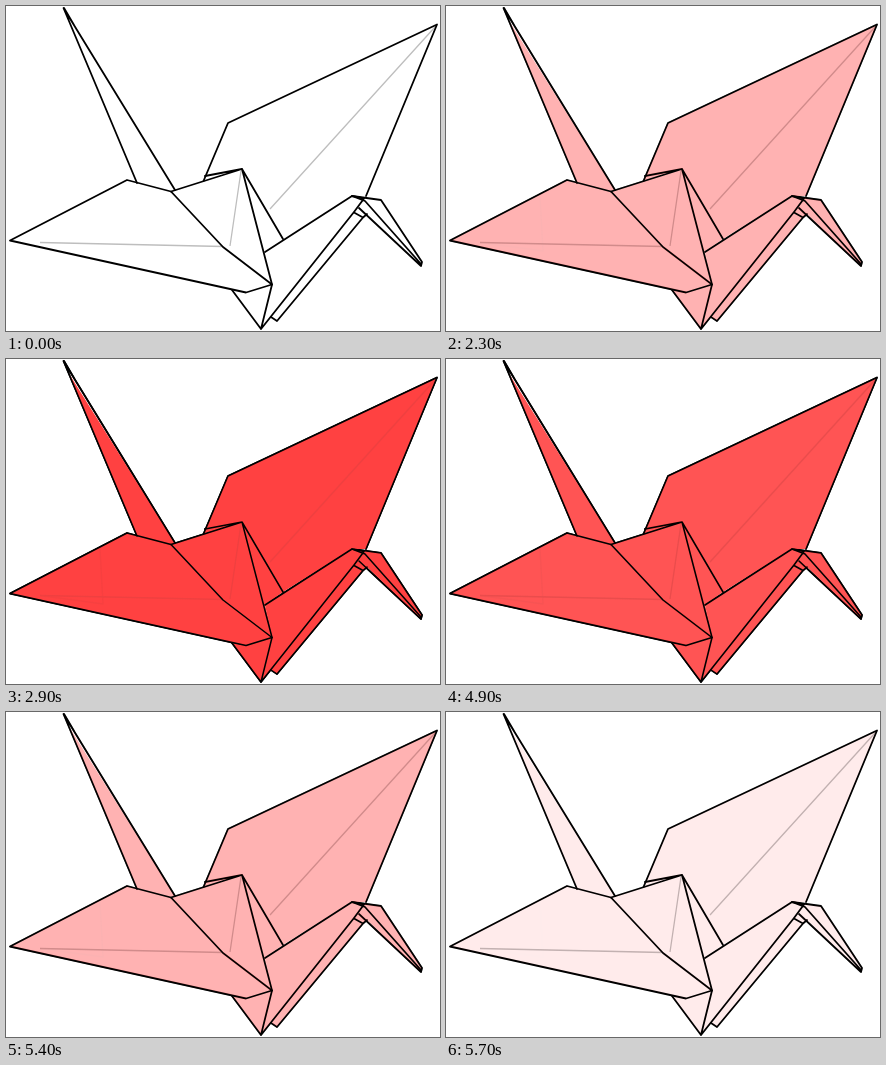
An HTML page that plays this animation: 434 px wide and 325 px high, repeating every 5.8 s.

```html
<!DOCTYPE html>
<html lang="en">
<head>
<meta charset="utf-8">
<title>Origami crane</title>
<style>
html, body { margin: 0; width: 100%; height: 100%; overflow: hidden; background: #fff; }
svg { display: block; width: 434px; height: 325px; }
.ink { fill: none; stroke: #000; stroke-linejoin: round; stroke-linecap: round; }
.crease { fill: none; stroke: #bebebe; stroke-width: 1.3; }
.paper { fill: #ff4141; }
.tint { opacity: 0; animation: tint 5800ms linear infinite; }
.tint .crease { stroke: #ef4040; }
/* Ten hard 100 ms steps up, then nine down before the loop returns to white. */
@keyframes tint {
  0% { opacity: 0; animation-timing-function: step-end; }
  34.48% { opacity: 0; animation-timing-function: steps(10, start); }
  51.72% { opacity: 1; }
  84.48% { opacity: 1; animation-timing-function: steps(9, start); }
  100% { opacity: .1; }
}
</style>
</head>
<body>
<svg viewBox="0 0 434 325">
  <defs>
    <g id="folds">
      <path d="M131 177 57.500 2 169 184M58 2 68 19"/>
      <path d="M165 185.500 121 174 4 234.500 240 286.500 266 278.500 217 241Z"/>
      <path d="M165 185.500 236 163 266 278.500M236 163 277 233M199 170 236 163"/>
      <path d="M197.500 175 222 117 431 18.500 360 190"/>
      <path d="M226 284 255 323 266 278.500M259 246 346 190 358 192.500 348 206 255 323"/>
      <path d="M265 311 271 315 357 211.500 348 206.500M357 211.500 361 208"/>
      <path d="M346 190 375 194 416 256 415 260 353 202M346 190 359 195 415 258"/>
    </g>
    <g id="creases">
      <path d="M34 236.500 217 240.500M235 165 224 240M429 21 264 203"/>
    </g>
  </defs>
  <use href="#creases" class="crease"/>
  <use href="#folds" class="ink" stroke-width="1.8"/>
  <g class="tint">
    <g class="paper">
      <path d="M62 13 131 177 165 185.500 169 184Z"/>
      <path d="M4 234.500 121 174 165 185.500 236 163 277 233 259 246 266 278.500 240 286.500Z"/>
      <path d="M197.500 175 222 117 431 18.500 360 190 346 190 277 233 236 163Z"/>
      <path d="M226 284 240 286.500 266 278.500 259 246 346 190 375 194 416 256 415 260 361 208 357 211.500 271 315 265 311 255 323Z"/>
    </g>
    <use href="#creases" class="crease"/>
    <path class="crease" d="M94 190 97 245 34 236.500" stroke-opacity=".5"/>
    <use href="#folds" class="ink" stroke-width="1.5"/>
  </g>
</svg>
</body>
</html>
```
